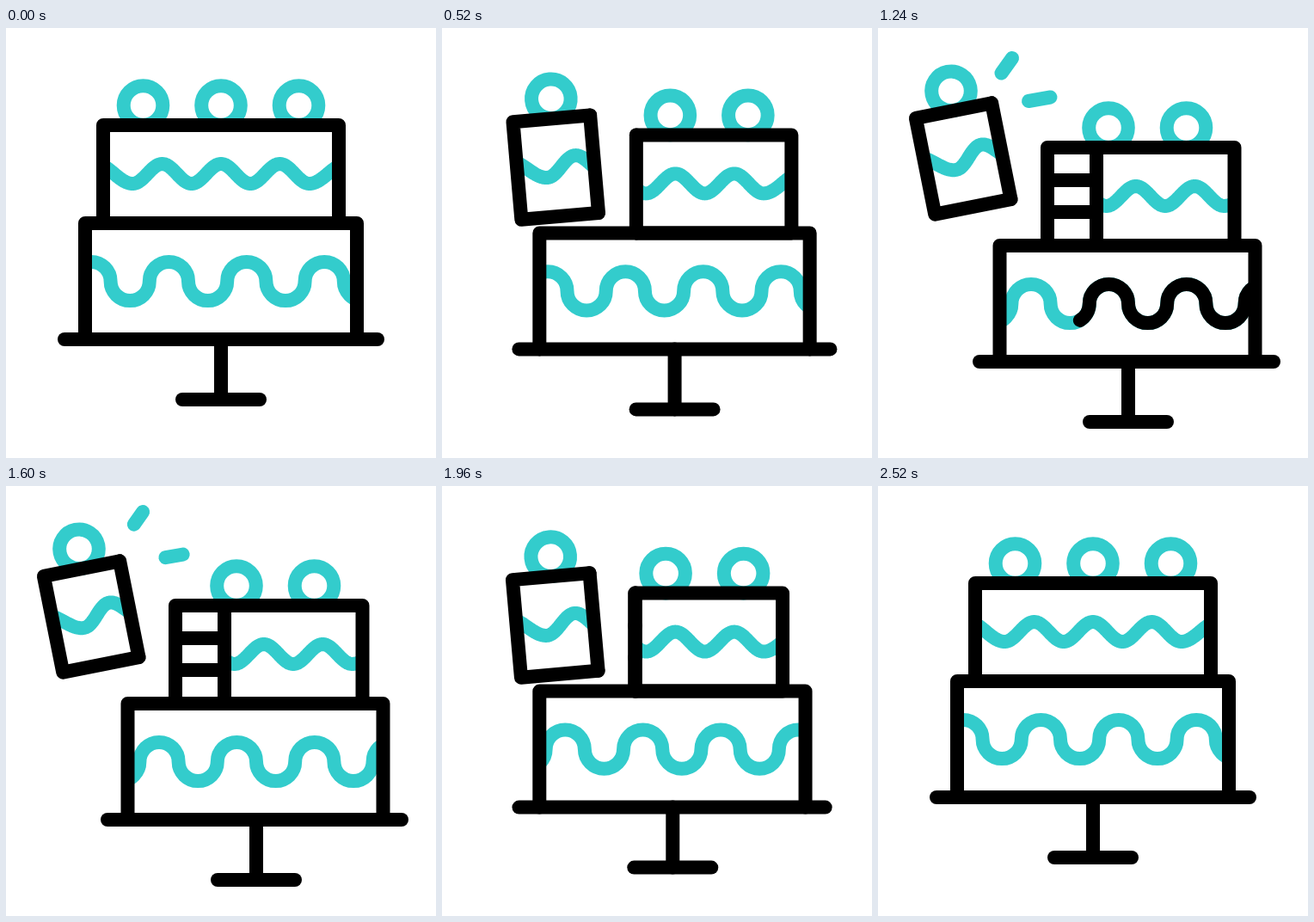
An HTML page with a canvas that plays this animation: 500 by 500 pixels, repeating every 2.6 s.

```html
<!DOCTYPE html>
<html lang="en">
<head>
<meta charset="utf-8">
<title>Cake</title>
<style>
html, body { margin: 0; width: 100%; height: 100%; overflow: hidden; background: #fff; }
canvas { display: block; }
</style>
</head>
<body>
<canvas id="stage" width="500" height="500"></canvas>
<script>
const LOOP = 2600, TEAL = '#33cccc', BLACK = '#000';
const ctx = document.getElementById('stage').getContext('2d');
ctx.lineWidth = 16;
ctx.lineCap = ctx.lineJoin = 'round';

const mix = (a, b, k) => a + (b - a) * k;
const span = (t, from, to) => Math.min(1, Math.max(0, (t - from) / (to - from)));
const smooth = (t, from, to) => {
  const u = span(t, from, to);
  return u * u * (3 - 2 * u);
};

// cubic-bezier(.5, 0, .15, 1)
function swift(t, from, to) {
  const u = span(t, from, to);
  let lo = 0, hi = 1;
  for (let i = 0; i < 24; i++) {
    const s = (lo + hi) / 2, r = 1 - s;
    if (1.5 * r * r * s + 0.45 * r * s * s + s * s * s < u) lo = s; else hi = s;
  }
  return lo * lo * (3 - 2 * lo);
}
const openClose = (t, a, b, c, d) => swift(t, a, b) - swift(t, c, d);

function line(color, ...points) {
  ctx.strokeStyle = color;
  ctx.beginPath();
  for (let i = 0; i < points.length; i += 2) ctx.lineTo(points[i], points[i + 1]);
  ctx.stroke();
}

function cherry(x, y) {
  ctx.strokeStyle = TEAL;
  ctx.beginPath();
  ctx.arc(x, y, 22.8, 0, 7);
  ctx.stroke();
}

function clipped(x, y, w, h, draw) {
  ctx.save();
  ctx.beginPath();
  ctx.rect(x, y, w, h);
  ctx.clip();
  draw();
  ctx.restore();
}

// Wave around a middle crest; it runs flatter past the outermost troughs.
function ripple(left, right, crest, y) {
  const half = 34.2, trough = 3 * half;
  clipped(left, y - 40, right - left, 80, () => {
    ctx.strokeStyle = TEAL;
    ctx.beginPath();
    for (let x = left - 16; x <= right + 16; x++) {
      const d = Math.abs(x - crest);
      const phase = d > trough ? mix(trough, d, 0.79) : d;
      ctx.lineTo(x, y - 11.5 * Math.cos(Math.PI * phase / half));
    }
    ctx.stroke();
  });
}

// Chain of half circles; a and b count halves from x0.
function scallops(color, x0, y, a, b) {
  if (b - a < 0.01) return;
  ctx.strokeStyle = color;
  ctx.beginPath();
  for (let i = Math.floor(a); i < b; i++) {
    const dir = i % 2 ? -1 : 1;
    const angle = f => Math.PI * (1 + dir * f);
    ctx.arc(x0 + (i + 0.5) * 45.2, y, 22.6,
      angle(Math.max(a - i, 0)), angle(Math.min(b - i, 1)), dir < 0);
  }
  ctx.stroke();
}

function drawSlice(move, cut) {
  ctx.save();
  ctx.translate(158 - 58.8 * move, 170 - 18 * move);
  ctx.rotate(-11.3 * move * Math.PI / 180);
  ctx.translate(-158, -170);
  cherry(159.5, 90);
  ripple(113, 203, 250, 169.5);
  line(BLACK, 203, 113, 113, 113, 113, 227, 203, 227);
  if (cut) line(BLACK, 203, 113, 203, 113 + 114 * cut);
  ctx.restore();
}

function drawCake(t, move, cut) {
  const slide = openClose(t, 258, 970, 1690, 2390);
  const turn = openClose(t, 410, 960, 1690, 2330);
  const face = openClose(t, 350, 960, 1690, 2330);
  const side = openClose(t, 410, 960, 1780, 2360);
  const depth = 57 * openClose(t, 580, 1000, 1610, 2020);
  ctx.save();
  ctx.translate(250 + 41 * slide, 26 * move);

  // Lower tier
  const left = mix(-158, -149.5, turn), right = mix(158, 147.5, turn);
  const x0 = -173.6 + 38 * side;
  clipped(left, 227, right - left, 135, () => {
    scallops(TEAL, x0, 294.5, -2, 9);
    scallops(BLACK, x0, 294.5,
      -0.5 + 7.3 * smooth(t, 1053, 1573), -0.5 + 7.3 * smooth(t, 629, 1150));
  });
  line(BLACK, left, 362, left, 227, right, 227, right, 362);

  // Stand
  line(BLACK, mix(-182, -173, turn), 362, mix(182, 169, turn), 362);
  line(BLACK, 0, 362, 0, 432);
  line(BLACK, -45, 432, 45, 432);

  // Upper tier
  const edge = mix(-47, -37, face), end = mix(137, 123.5, side);
  cherry(-23 * face, 90);
  cherry(90.5 - 23 * face, 90);
  ripple(edge, end, 8.8 * turn, 169.5);
  line(BLACK, edge, 113, end, 113, end, 227, edge, 227);
  if (cut) line(BLACK, edge, 113, edge, 113 + 114 * cut);

  // Layers on the cut face
  if (depth > 0.1) {
    const back = edge - depth;
    line(BLACK, edge, 113, back, 113, back, 227, edge, 227);
    for (const y of [151, 188]) line(BLACK, back, y, edge, y);
  }
  ctx.restore();
}

function drawSparks(t, move) {
  const grow = smooth(t, 620, 840);
  const out = smooth(t, 1460, 1705), fade = smooth(t, 1500, 1775);
  if (!grow || fade === 1) return;
  ctx.save();
  ctx.translate(59 * (1 - move), 18 * (1 - move));
  const spark = (nx, ny, fx, fy, ex, ey) => line(TEAL,
    mix(nx, ex, fade), mix(ny, ey, fade),
    mix(mix(nx, fx, grow), ex, out), mix(mix(ny, fy, grow), ey, out));
  spark(143.5, 52.5, 156, 35, 161, 27);
  spark(175, 85, 200.5, 80.5, 209, 79);
  ctx.restore();
}

function frame(now) {
  const t = now % LOOP;
  const move = openClose(t, 280, 970, 1690, 2390);
  const cut = smooth(t, 80, 270) - smooth(t, 2390, 2520);
  ctx.fillStyle = '#fff';
  ctx.fillRect(0, 0, 500, 500);
  drawCake(t, move, cut);
  drawSlice(move, cut);
  drawSparks(t, move);
  requestAnimationFrame(() => frame(performance.now() - start));
}
const start = performance.now();
frame(0);
</script>
</body>
</html>
```
